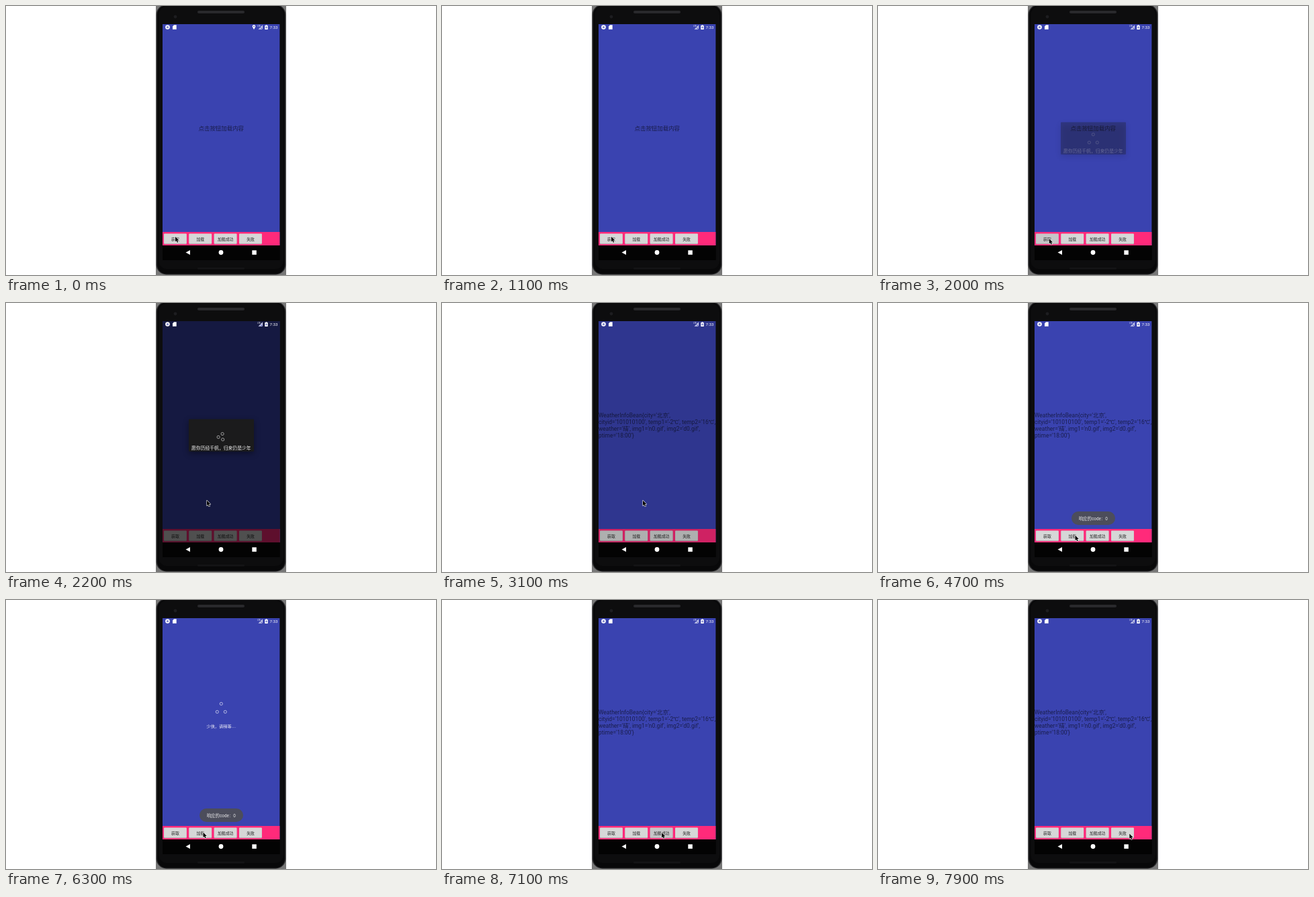
Animation, 640 px wide and 400 px high, one loop 8 s. Source, as an HTML page with a canvas:

```html
<!DOCTYPE html>
<html lang="zh-CN">
<head>
<meta charset="utf-8">
<style>
html, body { margin: 0; width: 100%; height: 100%; overflow: hidden; background: #fff; }
canvas { display: block; }
</style>
</head>
<body>
<canvas id="stage" width="640" height="400"></canvas>
<script>
const c = document.getElementById('stage').getContext('2d');
const LOOP = 8000, STEP = 100;
const BLUE = '#3a43b0', INK = 'rgba(0,0,0,.56)';
const SCREEN = { x: 233, y: 27, w: 174.6, h: 329 };
const MID = 320.3;

// Moments of the story, in ms
const PRESS_TIME = 200;
const CLICKS = [1850, 4800, 7000];
const DIALOG_AT = 2000, RESULT_AT = 3000, LOADING_AT = 4967, LOADED_AT = 7100;

const LABELS = ['获取', '加载', '加载成功', '失败'];
const INFO = ["WeatherInfoBean{city='北京',", "cityid='101010100', temp1='-2℃', temp2='16℃',",
  "weather='晴', img1='n0.gif', img2='d0.gif',", "ptime='18:00'}"];

// Pointer stops: when it sets off, and where it goes
const STOPS = [
  { at: -500, x: 252, y: 343 },
  { at: 1500, x: 254.8, y: 346 },
  { at: 2000, x: 299, y: 293.7 },
  { at: 3900, x: 293.5, y: 345.5 },
  { at: 6600, x: 327, y: 346 },
  { at: 7400, x: 374.3, y: 347.5 },
];
const MOVE_TIME = 200;

const clamp = v => Math.min(1, Math.max(0, v));
const mix = (a, b, k) => a + (b - a) * k;
const ease = k => k * k * (3 - 2 * k);
// Rises after `from` and falls back to 0 at `to`, each over `ms`
const fade = (t, from, to, ms) => clamp(Math.min(t - from, to - t) / ms);

function rect(x, y, w, h, fill, r = 0) {
  c.fillStyle = fill;
  c.beginPath();
  c.roundRect(x, y, w, h, r);
  c.fill();
}

function shape(d, fill) {
  c.fillStyle = fill;
  c.fill(new Path2D(d));
}

function disc(x, y, r, fill) {
  c.fillStyle = fill;
  c.beginPath();
  c.arc(x, y, r, 0, 7);
  c.fill();
}

function text(s, x, y, size, fill, align = 'center') {
  c.font = `${size}px Roboto, "Noto Sans CJK SC", "Noto Sans CJK", sans-serif`;
  c.textAlign = align;
  c.fillStyle = fill;
  c.fillText(s, x, y);
}

function withAlpha(alpha, paint) {
  c.save();
  c.globalAlpha = alpha;
  if (alpha > 0) paint();
  c.restore();
}

function phone() {
  rect(223, 0, 194, 400, '#777');
  rect(223.5, -2, 193, 401.5, '#2c2c2e', 15);
  rect(225, -1, 190, 399.5, '#080809', 14);
  rect(227.5, 1, 185.5, 390, '#0d0d0e', 12);
  rect(285, 7, 70, 4, '#29292c', 2);
  disc(252, 16, 2.4, '#1d1d20');
  rect(285, 389, 70, 2.5, '#141416', 1);
  rect(SCREEN.x, 356, SCREEN.w, 22, '#030303');
  shape('M267.5 366.5 l6.5 -3.5 v7z', '#fff');
  disc(320, 366.5, 3.4, '#fff');
  rect(366.3, 363.3, 6.5, 6.5, '#fff');
}

function statusBar(t) {
  disc(240.5, 31.5, 3.3, '#fff');
  disc(240.5, 31.5, 1.6, '#7c82c8');
  shape('M248 30.5 l2 -2.2 h3.7 v6.4 h-5.7z', '#fff');
  if (t < 1000) {
    shape('M369 35 l-2.2 -4 a2.3 2.3 0 1 1 4.4 0z', '#fff');
    disc(369, 30.4, .8, BLUE);
  }
  shape('M375.5 34.7 l6.5 -6.4 v6.4z', '#c8cbea');
  text('LTE', 376.7, 30.6, 3, '#fff');
  shape('M378.5 32 l.6 -.6 3 3 -.6 .6z', BLUE);
  rect(385.3, 29, 4.4, 6, '#fff', .5);
  rect(386.6, 28.2, 1.8, 1, '#fff');
  shape('M387.9 29.8 l-1.7 2.5 h1.1 l-.2 1.9 1.7 -2.6 h-1.1z', BLUE);
  text('7:33', 398.5, 33.8, 6.2, '#fff');
}

// Three rings chasing each other round a triangle, one lap in 2 s
function spinner(x, y, ms, color) {
  const corners = [[0, -6], [6, 6], [-6, 6]];
  const lap = ms / 2000 * 3, edge = Math.floor(lap), k = lap - edge;
  c.strokeStyle = color;
  c.lineWidth = .8;
  for (let i = 0; i < 3; i++) {
    const [ax, ay] = corners[(edge + i + 3) % 3], [bx, by] = corners[(edge + i + 4) % 3];
    c.beginPath();
    c.arc(x + mix(ax, bx, k), y + mix(ay, by, k), 2.1, 0, 7);
    c.stroke();
  }
}

function content(t) {
  if (t >= LOADING_AT && t < LOADED_AT) {
    spinner(MID, 160.3, t - LOADING_AT, '#d4d6f0');
    text('少侠，请稍等....', MID, 190.3, 6.2, '#f2f2fa');
  } else if (t < RESULT_AT) {
    text('点击按钮加载内容', MID, 184.7, 8.45, INK);
  } else {
    INFO.forEach((line, i) => text(line, SCREEN.x, 169.7 + i * 10, 8.45, INK, 'left'));
  }
}

function buttonBar(t) {
  rect(SCREEN.x, 336, SCREEN.w, 20, '#ff2a7a');
  LABELS.forEach((label, i) => {
    const x = 235 + i * 37.35, since = t - CLICKS[i];
    const pressed = since >= 0 && since < PRESS_TIME;
    rect(x, 339, 33.8, 15.3, '#b0909c', 1);
    rect(x, 338.6, 33.8, 15, pressed ? '#c6c6c8' : '#d6d7d7', 1);
    text(label, x + 17, 348.5, 5.9, '#222');
  });
}

function dialog(t) {
  withAlpha(fade(t, DIALOG_AT - 60, RESULT_AT + 90, 200), () => {
    c.shadowColor = 'rgba(0,0,0,.4)';
    c.shadowBlur = 8;
    c.shadowOffsetY = 3;
    rect(272, 172.7, 97, 48, '#1b1b1c', 1);
    c.shadowColor = 'transparent';
    spinner(MID, 197, t - DIALOG_AT, '#bbb');
    text('愿你历经千帆，归来仍是少年', MID, 218.4, 6.82, '#f2f2f2');
  });
}

function toast(t) {
  withAlpha(fade(t, 3200, 6900, 300), () => {
    rect(288, 310, 65, 20, '#4c4d5b', 10);
    text('响应的code：0', MID, 322.5, 6.4, '#e6e6e8');
  });
}

function pointer(t) {
  const next = STOPS.findLastIndex(s => t >= s.at);
  const to = STOPS[next], from = STOPS[Math.max(0, next - 1)];
  const k = ease(clamp((t - to.at) / MOVE_TIME));
  const arrow = new Path2D('M0 0 v7.6 l1.7 -1.5 1.2 2.7 1.3 -.6 -1.2 -2.6 2.3 -.2z');
  c.save();
  c.translate(mix(from.x, to.x, k), mix(from.y, to.y, k));
  c.strokeStyle = '#eee';
  c.lineWidth = 1.2;
  c.lineJoin = 'round';
  c.stroke(arrow);
  c.fillStyle = '#000';
  c.fill(arrow);
  c.restore();
}

function draw(t) {
  const { x, y, w, h } = SCREEN;
  rect(0, 0, 640, 400, '#fff');
  phone();
  c.save();
  c.beginPath();
  c.rect(x, y, w, h);
  c.clip();
  rect(x, y, w, h, BLUE);
  content(t);
  buttonBar(t);
  withAlpha(.63 * fade(t, DIALOG_AT, RESULT_AT + 160, 200), () => rect(x, y, w, h, '#000'));
  dialog(t);
  toast(t);
  statusBar(t);
  c.restore();
  pointer(t);
}

const start = performance.now();
function tick() {
  // The screen refreshes ten times a second
  const t = Math.max(0, performance.now() - start) % LOOP;
  draw(Math.floor(t / STEP) * STEP);
  requestAnimationFrame(tick);
}
tick();
</script>
</body>
</html>
```
